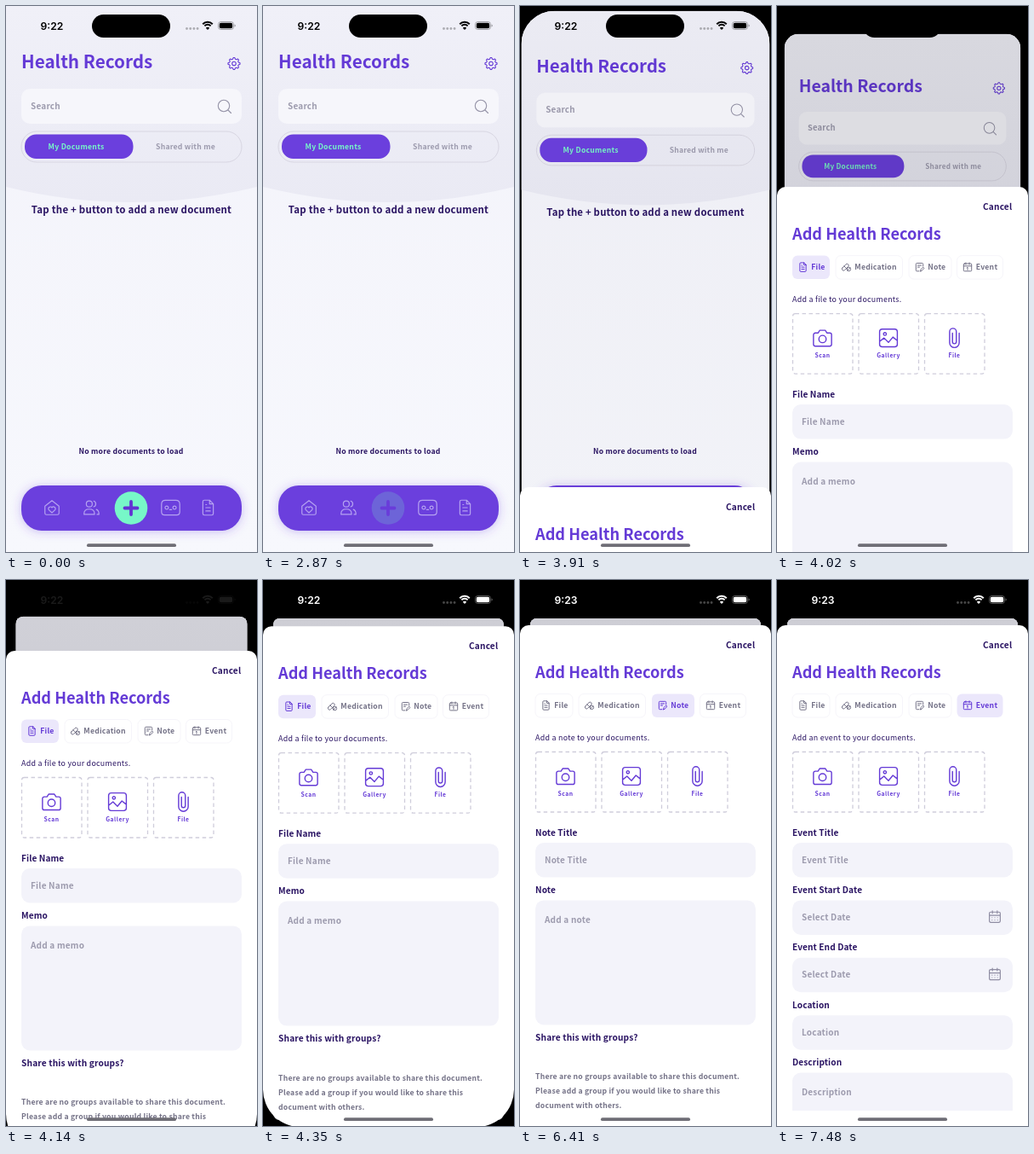
An HTML page for the animation above (9.7 s loop, 295 by 640 pixels).

```html
<!DOCTYPE html>
<html lang="en">
<head>
<meta charset="utf-8">
<title>Health Records</title>
<style>
html, body { margin: 0; height: 100%; overflow: hidden; background: #000; }
svg { display: block; width: 100%; height: 100%; font-family: "Noto Sans CJK JP", "Noto Sans CJK SC", "Noto Sans CJK", "Noto Sans", sans-serif; }
text { font-weight: 700; white-space: pre; }
</style>
</head>
<body>
<svg id="stage" viewBox="0 0 295 640"></svg>
<script>
const LOOP = 9700;
// Moments at which the screen redraws
const TICKS = [0, 2870, 2980, 3090, 3190, 3790, 3910, 4020, 4140, 4240, 4350, 5020,
  5220, 5330, 5440, 6050, 6200, 6310, 6410, 7120, 7260, 7370, 7480];
const PRESSES = [null, [5020, 5220], [6050, 6200], [7120, 7260]];

const PURPLE = '#643ad6', BAR = '#6b3fdd', MINT = '#77f7c8', INK = '#2a1463',
  HINT = '#9d9bae', GREY = '#747287', FIELD = '#f3f3fa';

const PAGE = 'M5 4h14a2 2 0 0 1 2 2v13a2 2 0 0 1-2 2H5a2 2 0 0 1-2-2V6a2 2 0 0 1 2-2zM3 9.5h18M8 2v4M16 2v4';
const ring = (x, y, r) => `M${x - r} ${y}a${r} ${r} 0 1 0 ${2 * r} 0a${r} ${r} 0 1 0 ${-2 * r} 0`;
const gear = () => {
  let d = '';
  for (let i = 0; i < 32; i++) {
    const a = (i - .5) * Math.PI / 16, r = i % 4 < 2 ? 10.6 : 8.2;
    d += (i ? 'L' : 'M') + (12 + r * Math.cos(a)).toFixed(2) + ' ' + (12 + r * Math.sin(a)).toFixed(2);
  }
  return d + 'z' + ring(12, 12, 3.4);
};
const ICONS = {
  file: 'M14 2H7a2 2 0 0 0-2 2v16a2 2 0 0 0 2 2h10a2 2 0 0 0 2-2V7zM14 2v5h5M9 12h6M9 16.5h6M9 8h1',
  pill: 'M3.2 13.5 11 5.7a3.6 3.6 0 0 1 5.1 5.1l-7.8 7.8a3.6 3.6 0 0 1-5.1-5.1zM7 9.6l5 5' + ring(17.5, 16.5, 4.3) + 'M14.5 19.5l6-6',
  note: 'M20 10V5a2 2 0 0 0-2-2H6a2 2 0 0 0-2 2v14a2 2 0 0 0 2 2h5M8 8h8M8 12h4M14 21l1-4 5-5 2.5 2.5-5 5z',
  event: PAGE + 'M10.5 13.5l1.5-1.5v6',
  dates: PAGE + [7.5, 12, 16.5].map(x => `M${x} 13.2h.01M${x} 17.2h.01`).join(''),
  camera: 'M9 3.5h6l2 3h3a2 2 0 0 1 2 2v10.5a2 2 0 0 1-2 2H4a2 2 0 0 1-2-2V8.500a2 2 0 0 1 2-2h3z' + ring(12, 13.2, 4),
  gallery: 'M5 2h14a3 3 0 0 1 3 3v14a3 3 0 0 1-3 3H5a3 3 0 0 1-3-3V5a3 3 0 0 1 3-3zM2 16l5-4 5 5 5-6 5 4' + ring(8, 7.500, 1.6),
  clip: 'M17 7v10a5 5 0 0 1-10 0V5.5a3.5 3.5 0 0 1 7 0V16a2 2 0 0 1-4 0V7',
  home: 'M3 10l9-7 9 7v9a2 2 0 0 1-2 2H5a2 2 0 0 1-2-2zM12 18.500l-4-3.600a2.400 2.400 0 0 1 4-3a2.400 2.400 0 0 1 4 3z',
  people: ring(9, 7, 4) + 'M2 21v-1c0-4 3-6 7-6s7 2 7 6v1zM15 3.200a4 4 0 0 1 0 7.600M18.500 14.500c2.500.9 3.500 3 3.500 6.500h-2.500',
  face: 'M6 3.500h12q4.500 0 4.500 4.500v9q0 3.500-3.500 3.500H5q-3.500 0-3.500-3.500V8q0-4.500 4.500-4.500z' + ring(7.5, 12, 1.9) + ring(16.5, 12, 1.9) + 'M10.800 14.300h2.400',
  gear: gear()
};

const FORMS = [
  { name: 'File', what: 'a file', icon: 'file', x: 18, w: 44, share: true,
    fields: [['File Name', 'File Name'], ['Memo', 'Add a memo', 146]] },
  { name: 'Medication', what: 'a medication', icon: 'pill', x: 69, w: 78.5, more: true,
    fields: [['Medication Name', 'Medication Name'], ['Frequency', 'Select Frequency'],
      ['Duration', 'Select Dates', 40.5, true], ['Medication Description', 'Medication Description', 72.5]] },
  { name: 'Note', what: 'a note', icon: 'note', x: 155, w: 50, share: true,
    fields: [['Note Title', 'Note Title'], ['Note', 'Add a note', 146]] },
  { name: 'Event', what: 'an event', icon: 'event', x: 211.5, w: 54,
    fields: [['Event Title', 'Event Title'], ['Event Start Date', 'Select Date', 40.5, true],
      ['Event End Date', 'Select Date', 40.5, true], ['Location', 'Location'], ['Description', 'Description', 72.5]] }
];

const clamp = v => Math.max(0, Math.min(1, v));
const mix = (a, b, k) => a + (b - a) * k;

// y is the middle of the capitals
const text = (x, y, s, size, fill, space = .2, extra = '') =>
  `<text x="${x}" y="${y + size * .366}" font-size="${size}" fill="${fill}" letter-spacing="${space}" ${extra}>${s}</text>`;
const MID = 'text-anchor="middle"';
const rect = (x, y, w, h, r, fill, extra = '') =>
  `<rect x="${x}" y="${y}" width="${w}" height="${h}" rx="${r}" fill="${fill}" ${extra}/>`;
const icon = (name, cx, cy, size, color, width) =>
  `<path d="${ICONS[name]}" transform="translate(${cx - size / 2} ${cy - size / 2}) scale(${size / 24})" fill="none"
    stroke="${color}" stroke-width="${width * 24 / size}" stroke-linecap="round" stroke-linejoin="round"/>`;

const DEFS = `<defs>
  <linearGradient id="head" x2="0" y2="1"><stop stop-color="#f0f0f8"/><stop offset="1" stop-color="#eaeaf4"/></linearGradient>
  <linearGradient id="body" x2="0" y2="1"><stop stop-color="#f3f3fa"/><stop offset="1" stop-color="#f7f8fd"/></linearGradient>
  <filter id="glow" x="-20%" y="-50%" width="140%" height="200%"><feGaussianBlur stdDeviation="6"/></filter>
  <clipPath id="scroll"><rect width="295" height="622"/></clipPath>`;

function home(t) {
  const lit = mix(.2, 1, t < 2870 ? 1 : clamp((t - 2870) / 320));
  const tab = (name, x, size) => icon(name, x, 588, size, '#b5a2f1', 1.2);
  return rect(0, 0, 295, 640, 0, 'url(#body)') +
    '<path d="M0 0H295V212Q147 248 0 212z" fill="url(#head)"/>' +
    text(18, 65, 'Health Records', 20.7, PURPLE, 0) +
    icon('gear', 268, 67.5, 16, PURPLE, 1.1) +
    rect(18, 97, 259, 41, 10, '#f6f6fb') + text(29, 117, 'Search', 10, HINT) +
    `<path d="${ring(256, 117, 6.7)}M261 122l3.500 3.500" fill="none" stroke="#9694a8" stroke-width="1.1" stroke-linecap="round"/>` +
    rect(18, 147, 259, 36, 18, 'none', 'stroke="#d8d6e2"') +
    rect(22, 150.5, 127.5, 28.5, 13.5, BAR) +
    text(82.5, 164.5, 'My Documents', 8.7, MINT, .25, MID) +
    text(211, 164.5, 'Shared with me', 8.7, HINT, .2, MID) +
    text(147.5, 239, 'Tap the + button to add a new document', 11.5, INK, .2, MID) +
    text(147, 521.5, 'No more documents to load', 8.7, INK, .2, MID) +
    rect(18, 563, 259, 53, 24, '#6b3fdd55', 'filter="url(#glow)"') +
    rect(18, 562, 259, 53, 24, BAR) +
    tab('home', 54, 22) + tab('people', 100.5, 21) + tab('face', 193.5, 24.5) + tab('file', 237.5, 21) +
    `<g opacity="${lit}"><circle cx="147" cy="588.5" r="19.3" fill="${MINT}"/>
      <path d="M139.500 588.500h15M147 581v15" stroke="#6233d3" stroke-width="3.8" stroke-linecap="round"/></g>`;
}

function chip(form, i, active, t) {
  const p = PRESSES[i];
  const seen = p && t >= p[0] ? mix(.2, 1, clamp((t - p[1] + 60) / 270)) : 1;
  const color = i === active ? PURPLE : GREY;
  return `<g opacity="${seen}">` +
    rect(form.x, 133.5, form.w, 27.5, 6, i === active ? '#ebe7fb' : '#fff', i === active ? '' : 'stroke="#f6f5fa"') +
    icon(form.icon, form.x + 12.5, 147, 12.5, color, 1) +
    text(form.x + 22.3, 147, form.name, 8.7, color) + '</g>';
}

function fields(form) {
  let y = 296, out = '';
  for (const [label, hint, h = 40.5, dates] of form.fields) {
    out += text(18, y, label, 10.1, INK, .1) + rect(18, y + 12, 259, h, 10, FIELD) +
      text(29, y + (h > 50 ? 34.5 : 32), hint, 10, HINT);
    if (dates) out += icon('dates', 256, y + 31.5, 17, '#8f8da3', 1.2);
    y += h + 26.9;
  }
  if (form.share) {
    out += text(18, y, 'Share this with groups?', 10.2, INK, .13);
    ['There are no groups available to share this document.',
      'Please add a group if you would like to share this',
      'document with others.'].forEach((s, i) => out += text(18, y + 46 + 17 * i, s, 8.7, GREY));
  }
  if (form.more) out += text(147, 611, 'View more', 10.2, PURPLE, .25, MID);
  return out;
}

function sheet(t) {
  const active = PRESSES.filter(p => p && t >= p[1]).length, form = FORMS[active];
  const r = t < 5020 ? 44 : 0;
  const sources = [['camera', 'Scan', 25.5], ['gallery', 'Gallery', 25], ['clip', 'File', 27]];
  return `<path d="M0 ${640 - r}V63a10 10 0 0 1 10-10H285a10 10 0 0 1 10 10V${640 - r}a${r} ${r} 0 0 1 ${-r} ${r}H${r}a${r} ${r} 0 0 1 ${-r} ${-r}z" fill="#fff"/>` +
    text(242, 76, 'Cancel', 10.1, INK) +
    text(18, 108, 'Add Health Records', 18.2, PURPLE, 0) +
    FORMS.map((f, i) => chip(f, i, active, t)).join('') +
    text(18, 185, `Add ${form.what} to your documents.`, 8.9, INK, .27, 'style="font-weight:500"') +
    sources.map(([name, label, size], i) => {
      const x = 18.5 + 77.5 * i;
      return rect(x, 201.5, 70.5, 70.5, 3, 'none', 'stroke="#cfcddb" stroke-width="1.3" stroke-dasharray="4.5 3.500"') +
        icon(name, x + 35, 230, size, PURPLE, 1.4) + text(x + 35, 250.5, label, 6.8, PURPLE, .5, MID);
    }).join('') +
    `<g clip-path="url(#scroll)">${fields(form)}</g>`;
}

function status(t) {
  const v = Math.round(255 * clamp((t - 4120) / 200)), c = `rgb(${v},${v},${v})`;
  const arc = r => `M${237 - r * .72} ${27 - r * .72}A${r} ${r} 0 0 1 ${237 + r * .72} ${27 - r * .72}`;
  return rect(101, 10, 92, 27, 13.5, '#000') +
    text(54, 23.3, t < 5020 ? '9:22' : '9:23', 12.2, c, 0, MID + ' style="font-family:Inter,sans-serif;font-weight:600"') +
    [212.5, 216.7, 220.9, 225.1].map(x => `<circle cx="${x}" cy="26.5" r="1.4" fill="${c}" opacity=".28"/>`).join('') +
    `<path d="${arc(8)}${arc(5)}" fill="none" stroke="${c}" stroke-width="2"/>
     <path d="M237 28l-2.200-2.200a3.100 3.100 0 0 1 4.400 0z" fill="${c}"/>` +
    rect(249.5, 18.5, 18, 9, 3, 'none', `stroke="${c}" stroke-opacity=".4" stroke-width=".8"`) +
    rect(250.8, 19.8, 15.4, 6.4, 1.9, c) +
    `<path d="M268.700 21.500a1.700 1.700 0 0 1 0 3z" fill="${c}" opacity=".5"/>`;
}

function scene(t) {
  // Critically damped spring for the sheet and the receding page
  const x = Math.max(0, t - 3875) * .0178, p = 1 - (1 + x) * Math.exp(-x);
  const radius = p ? mix(44, 8, p) : 0;
  return DEFS + `<clipPath id="card">${rect(0, 0, 295, 640, radius, '#000')}</clipPath></defs>` +
    rect(0, 0, 295, 640, 0, '#000') +
    `<g transform="translate(${12 * p} ${45 * p}) scale(${1 - 24 / 295 * p})"><g clip-path="url(#card)">` +
    home(t) + rect(0, 0, 295, 640, 0, '#000', `opacity="${.14 * p}"`) + '</g></g>' +
    (p ? `<g transform="translate(0 ${587 * (1 - p)})">${sheet(t)}</g>` : '') +
    status(t) + rect(95, 630.3, 105, 3.7, 1.85, '#6f6e76');
}

const stage = document.getElementById('stage');
let start = null, shown = -1;
function frame(now) {
  if (start === null) start = now;
  const t = (now - start) % LOOP, tick = TICKS.filter(k => k <= t).pop();
  if (tick !== shown) stage.innerHTML = scene(shown = tick);
  requestAnimationFrame(frame);
}
requestAnimationFrame(frame);
</script>
</body>
</html>
```
